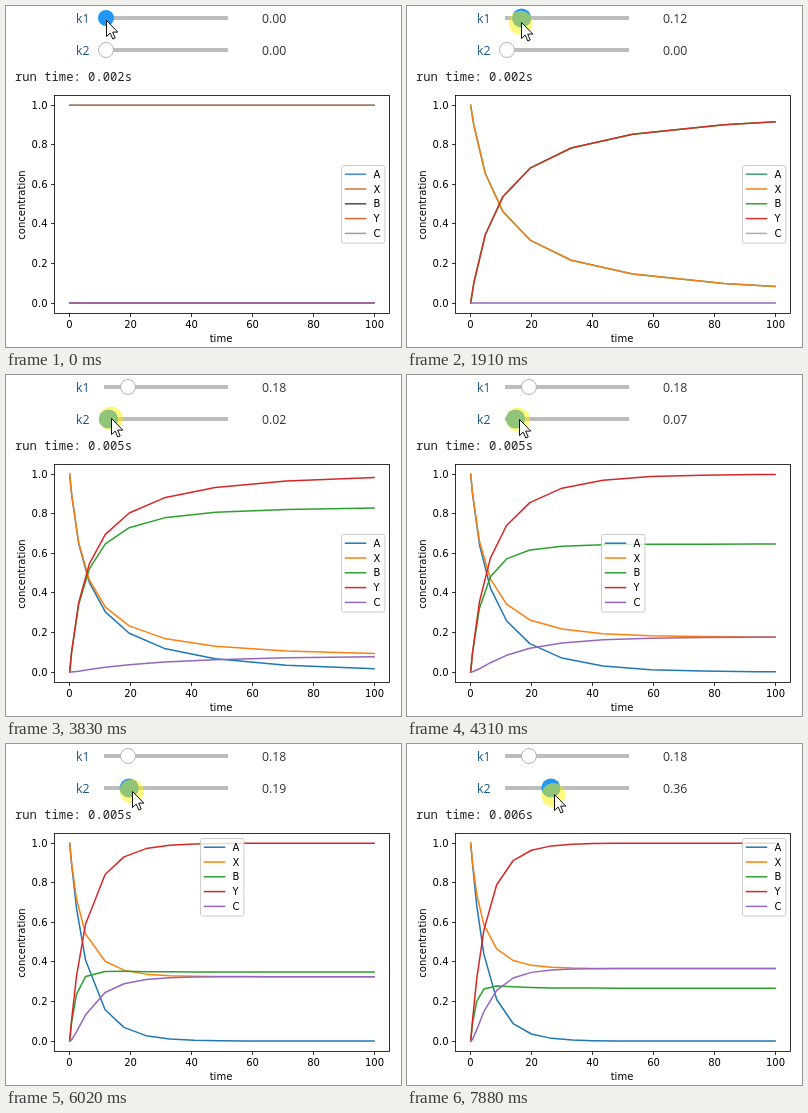
An HTML page that plays this animation: 395x341 px, repeating every 8 s.

```html
<!DOCTYPE html>
<html lang="en">
<head>
<meta charset="utf-8">
<title>Reaction kinetics</title>
<style>
  html, body { margin: 0; width: 100%; height: 100%; overflow: hidden; background: #fff; }
  svg { display: block; }
  .plot { font: 10px "DejaVu Sans", sans-serif; }
  .ui { font: 12.3px "Open Sans", sans-serif; fill: #333; }
  .name { fill: #1c5688; }
  .mono { font: 12.2px "Noto Sans Mono", monospace; fill: #222; }
  .axis { fill: none; stroke: #000; stroke-width: .8; }
  .curve { fill: none; stroke-width: 1.5; stroke-linejoin: round; stroke-linecap: square; }
</style>
</head>
<body>
<svg id="stage" width="395" height="341" viewBox="0 0 395 341"></svg>
<script>
const LOOP = 8000, TICK = 70, PLOT_LAG = 2 * TICK;
const PRESS_1 = 140, RELEASE_1 = 2430, HOVER_2 = 2820, PRESS_2 = 3150;
const NAMES = ["A", "X", "B", "Y", "C"];
const AXES = { x: 48.5, y: 89.5, w: 335, h: 218 };
const LEGEND = { w: 43.4, h: 77.6, pad: 5 };
const BLUE = "#2196f3", PURPLE = "#9467bd";

// Key points: slider values, then things that switch at a time.
const K1 = [[700, 0], [1400, .10], [1890, .12], [2030, .18]];
const K2 = [[3370, 0], [4130, .04], [4270, .07], [4690, .11], [5070, .11], [5790, .19],
  [6020, .19], [6400, .24], [7010, .24], [7700, .30], [7840, .36]];
const RUN_MS = [[0, 2], [2030, 5], [4830, 3], [5390, 5], [7010, 6]];
const TINTS = [
  [0, ["#3b8dd2", "#d0742e", "#584855", "#cf6a35", "#9a9fb4"]],
  [760, ["#3f9a6b", "#f5801a", "#35a135", "#d03029", "#b1a9bd"]],
  [3760, ["#1f77b4", "#ff7f0e", "#2ca02c", "#d62728", PURPLE]]
];
// Legend place as a fraction of the free room across and down.
const RIGHT = [1, .5], CENTER = [.5, .5], TOP = [.5, 0], CORNER = [1, 0];
const PLACES = [[0, RIGHT], [4130, CENTER], [4480, CORNER], [4620, TOP],
  [5390, CORNER], [6020, TOP], [6230, CORNER]];

function lerpKeys(keys, t) {
  const i = keys.findIndex(k => k[0] > t);
  if (i < 0) return keys[keys.length - 1][1];
  if (i === 0) return keys[0][1];
  const [ta, a] = keys[i - 1], [tb, b] = keys[i];
  return a + (b - a) * (t - ta) / (tb - ta);
}
const holdKeys = (keys, t) => keys.filter(k => k[0] <= t).pop()[1];
const rate = (keys, t) => Math.round(lerpKeys(keys, t) * 100) / 100;

// Kinetics: A + X -> B + Y (k1), A + B -> C + Y (k2).
function slopes([A, X, B], k1, k2) {
  const r1 = k1 * A * X, r2 = k2 * A * B;
  return [-r1 - r2, -r1, r1 - r2, r1 + r2, r2];
}

// Adaptive Dormand-Prince solver; its own steps are the curve's corner points.
const STAGES = [
  [1 / 5],
  [3 / 40, 9 / 40],
  [44 / 45, -56 / 15, 32 / 9],
  [19372 / 6561, -25360 / 2187, 64448 / 6561, -212 / 729],
  [9017 / 3168, -355 / 33, 46732 / 5247, 49 / 176, -5103 / 18656],
  [35 / 384, 0, 500 / 1113, 125 / 192, -2187 / 6784, 11 / 84]
];
const ERROR = [-71 / 57600, 0, 71 / 16695, -71 / 1920, 17253 / 339200, -22 / 525, 1 / 40];
const RTOL = 1e-3, ATOL = 1e-6;
const rms = v => Math.sqrt(v.reduce((s, x) => s + x * x, 0) / v.length);
const blend = (ks, w) => ks[0].map((_, j) => w.reduce((s, c, i) => s + c * ks[i][j], 0));
const advance = (y, d, h) => y.map((v, j) => v + h * d[j]);

function firstStep(y, f, rhs) {
  const scaled = v => rms(v.map((x, j) => x / (ATOL + Math.abs(y[j]) * RTOL)));
  const d0 = scaled(y), d1 = scaled(f);
  const h0 = d1 < 1e-5 ? 1e-6 : .01 * d0 / d1;
  const f1 = rhs(advance(y, f, h0));
  const d2 = scaled(f1.map((v, j) => v - f[j])) / h0;
  const top = Math.max(d1, d2);
  const h1 = top <= 1e-15 ? 1e-6 : Math.pow(.01 / top, .2);
  return Math.min(100 * h0, h1);
}

function solve(k1, k2, end = 100) {
  const rhs = y => slopes(y, k1, k2);
  let t = 0, y = [1, 1, 0, 0, 0], f = rhs(y), h = firstStep(y, f, rhs), rejected = false;
  const out = [[t, y]];
  while (t < end) {
    h = Math.min(h, end - t);
    const ks = [f];
    let next;
    for (const w of STAGES) {
      next = advance(y, blend(ks, w), h);
      ks.push(rhs(next));
    }
    const err = rms(blend(ks, ERROR).map((e, j) =>
      h * e / (ATOL + RTOL * Math.max(Math.abs(y[j]), Math.abs(next[j])))));
    const grow = err === 0 ? 10 : .9 * Math.pow(err, -.2);
    if (err < 1) {
      t = end - t - h < 1e-9 ? end : t + h;
      y = next;
      f = ks[6];
      out.push([t, y]);
      h *= Math.min(rejected ? 1 : 10, grow);
      rejected = false;
    } else {
      h *= Math.max(.2, grow);
      rejected = true;
    }
  }
  return out;
}

// Drawing
const px = t => 63.7 + 3.044 * t;
const py = v => 297 - 197.75 * v;
const crisp = v => Math.floor(v) + .5;
const stage = document.getElementById("stage");

function set(el, attrs) {
  for (const k in attrs) el.setAttribute(k, attrs[k]);
}
function add(tag, attrs, parent = stage, text = "") {
  const el = document.createElementNS("http://www.w3.org/2000/svg", tag);
  set(el, attrs);
  if (text) el.textContent = text;
  return parent.appendChild(el);
}

function slider(name, y) {
  add("text", { class: "ui name", x: 70, y: y + 5 }, stage, name);
  add("rect", { x: 98, y: y - 2, width: 124, height: 4, fill: "#bdbdbd" });
  const value = add("text", { class: "ui", x: 256, y: y + 5 });
  const knob = add("circle", { cy: y });
  return (k, lit, held) => {
    value.textContent = k.toFixed(2);
    set(knob, { cx: 100 + 122 * k, r: held ? 9.6 : lit ? 8 : 7.5,
      fill: lit ? BLUE : "#fff", stroke: lit ? "none" : "#b4b4b4" });
  };
}
const slider1 = slider("k1", 12), slider2 = slider("k2", 44);
const runTime = add("text", { class: "mono", x: 9, y: 75 });

const plot = add("g", { class: "plot" });
const curves = NAMES.map(() => add("path", { class: "curve" }, plot));
add("rect", { class: "axis", x: AXES.x, y: AXES.y, width: AXES.w, height: AXES.h }, plot);
for (let i = 0; i <= 5; i++) {
  const x = crisp(px(20 * i)), y = crisp(py(i / 5));
  add("path", { class: "axis", d: `M${x} 307.5v3.5M48.5 ${y}h-3.5` }, plot);
  add("text", { x, y: 322, "text-anchor": "middle" }, plot, String(20 * i));
  add("text", { x: 41.5, y: y + 3.5, "text-anchor": "end" }, plot, (i / 5).toFixed(1));
}
add("text", { x: 215, y: 336, "text-anchor": "middle" }, plot, "time");
add("text", { transform: "translate(19 199) rotate(-90)", "text-anchor": "middle" }, plot, "concentration");

const legend = add("g", {}, plot);
add("rect", { width: LEGEND.w, height: LEGEND.h, rx: 2, fill: "#fff", "fill-opacity": .8, stroke: "#ccc" }, legend);
const swatches = NAMES.map((name, i) => {
  const y = 8.7 + 14.8 * i;
  add("text", { x: 32, y: y + 3.6 }, legend, name);
  return add("path", { class: "curve", d: `M4 ${y}h20` }, legend);
});

const glow = add("circle", { r: 12, fill: "#fff200", "fill-opacity": .5 });
const pointer = add("path", { d: "M0 0V16L3.7 12.6L6.3 18.5L8.7 17.5L6.2 11.6H11.3Z", fill: "#fff", stroke: "#111" });

function drawPlot(t, k1, k2) {
  const data = solve(k1, k2), tint = holdKeys(TINTS, t);
  NAMES.forEach((_, j) => {
    const pts = data.map(([s, y]) => `${px(s).toFixed(2)} ${py(y[j]).toFixed(2)}`);
    set(curves[j], { d: "M" + pts.join("L"), stroke: j === 4 ? PURPLE : tint[j] });
    set(swatches[j], { stroke: tint[j] });
  });
  const [across, down] = holdKeys(PLACES, t), { w, h, pad } = LEGEND;
  const x = AXES.x + pad + across * (AXES.w - w - 2 * pad);
  const y = AXES.y + pad + down * (AXES.h - h - 2 * pad);
  set(legend, { transform: `translate(${crisp(x)} ${crisp(y)})` });
}

// Dragging drifts the pointer down a little; between drags it travels to the second knob.
function drawPointer(t, k1, k2, held) {
  const go = Math.min(1, Math.max(0, (t - 2310) / 510));
  const x = 100 + 122 * (k1 * (1 - go) + k2) + 3.5 * go;
  const y = 14 + 22 * (k1 * (1 - go) + k2) + 29 * go;
  set(glow, { cx: x - 1, cy: y, visibility: held ? "visible" : "hidden" });
  set(pointer, { transform: `translate(${crisp(x)} ${crisp(y)})` });
}

function draw(t) {
  const k1 = rate(K1, t), k2 = rate(K2, t), seen = t - PLOT_LAG;
  const held1 = t >= PRESS_1 && t < RELEASE_1, held2 = t >= PRESS_2;
  slider1(k1, !held2, held1);
  slider2(k2, t >= HOVER_2, held2);
  runTime.textContent = `run time: 0.00${holdKeys(RUN_MS, t)}s`;
  drawPlot(t, rate(K1, seen), rate(K2, seen));
  drawPointer(t, k1, k2, held1 || held2);
}

let shown = -1;
const start = performance.now();
function tick() {
  const t = Math.floor((performance.now() - start) % LOOP / TICK) * TICK;
  if (t !== shown) draw(shown = t);
  requestAnimationFrame(tick);
}
tick();
</script>
</body>
</html>
```
